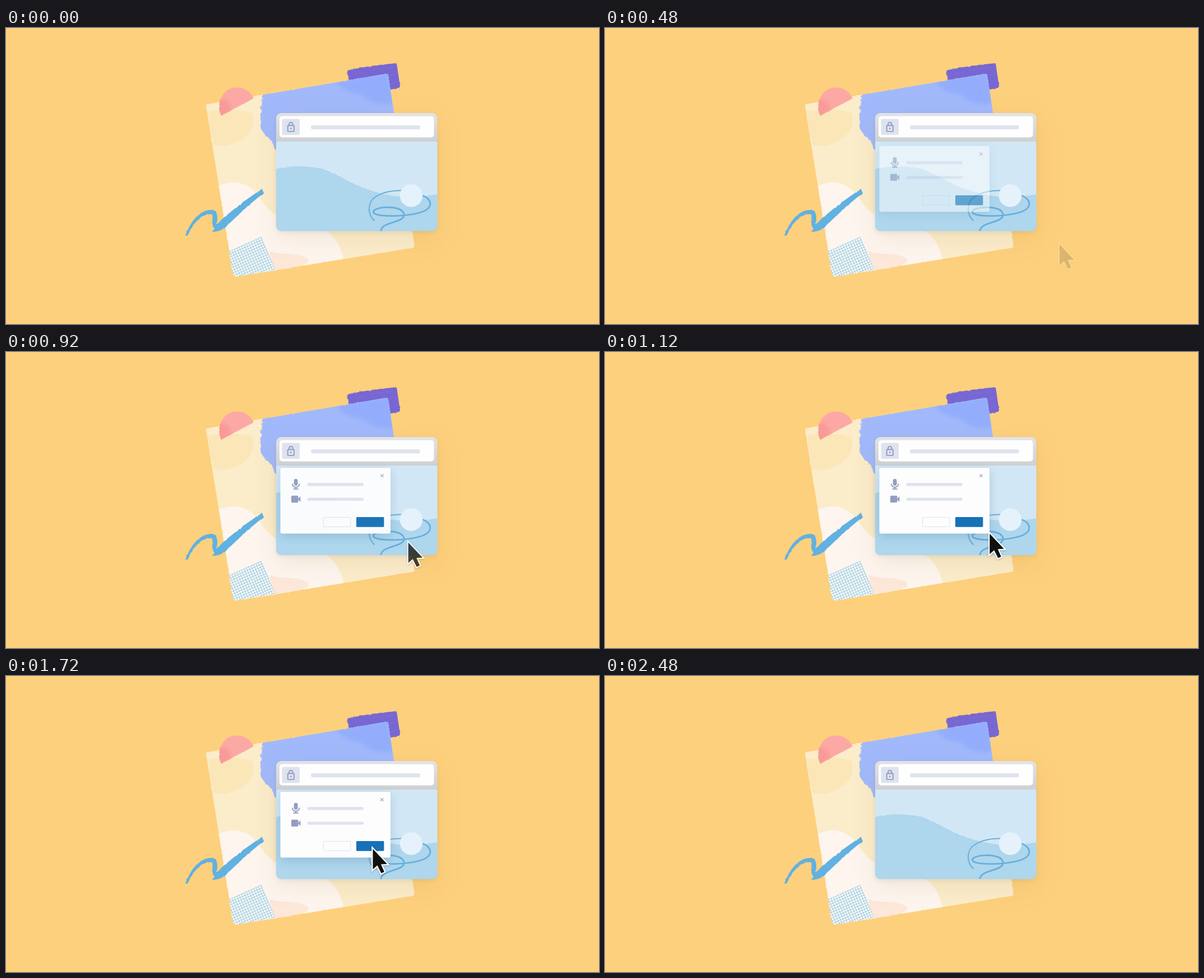
An HTML page that plays this animation: 1058 px wide and 529 px high, repeating every 4 s.

```html
<!DOCTYPE html>
<html lang="en">
<head>
<meta charset="utf-8">
<title>Permission prompt</title>
<style>
html, body { margin: 0; height: 100%; overflow: hidden; background: #fdd07d; }
svg { display: block; width: 100%; height: 100%; }
#window { filter: drop-shadow(0 14px 20px rgba(150, 110, 40, .1)) drop-shadow(0 2px 3px rgba(90, 90, 90, .1)); }
#dialog { filter: drop-shadow(0 5px 9px rgba(50, 90, 130, .22)); }
#cursor { filter: drop-shadow(0 1px 1.5px rgba(0, 0, 0, .25)); }
</style>
</head>
<body>
<svg viewBox="0 0 1058 529">
  <defs>
    <filter id="rough" x="-5%" y="-5%" width="110%" height="110%" color-interpolation-filters="sRGB">
      <feTurbulence type="fractalNoise" baseFrequency=".13" numOctaves="3" seed="4"/>
      <feColorMatrix values="1 0 0 0 0  0 1 0 0 0  0 0 1 0 0  0 0 0 0 1" result="noise"/>
      <feDisplacementMap in="SourceGraphic" in2="noise" scale="2.5" xChannelSelector="R" yChannelSelector="G"/>
    </filter>
    <filter id="torn" x="-5%" y="-5%" width="110%" height="110%" color-interpolation-filters="sRGB">
      <feTurbulence type="fractalNoise" baseFrequency=".12" numOctaves="3" seed="9"/>
      <feColorMatrix values="1 0 0 0 0  0 1 0 0 0  0 0 1 0 0  0 0 0 0 1" result="noise"/>
      <feDisplacementMap in="SourceGraphic" in2="noise" scale="8" xChannelSelector="R" yChannelSelector="G"/>
    </filter>
    <filter id="soft"><feGaussianBlur stdDeviation="3"/></filter>
    <pattern id="grid" width="4.7" height="4.7" patternUnits="userSpaceOnUse" patternTransform="translate(398 399) rotate(-24)">
      <path d="M0 .5H4.7M.5 0V4.7" stroke="#86c2e6" stroke-width=".85"/>
    </pattern>
    <linearGradient id="bar" x2="0" y2="1">
      <stop stop-color="#e3e3e5"/><stop offset="1" stop-color="#cfd0d2"/>
    </linearGradient>
    <clipPath id="sheet"><path d="M357 140Q356 137 360 136L678 82Q681 81 682 85L729 389Q730 392 726 393L411 444Q406 444 405 439Z"/></clipPath>
    <clipPath id="page"><rect x="482" y="152" width="287.5" height="211" rx="9"/></clipPath>
    <clipPath id="half"><path id="halfShape" d="M384 157C375 140 383 114 402 108C420 103 436 111 442 126C422 136 402 147 384 157Z"/></clipPath>
  </defs>

  <g filter="url(#rough)">
    <path d="M609 78Q609 76 612 75Q650 67 695 63Q698 64 698 70L703 104Q703 107 700 107L687 110L613 98Z" fill="#7867d3"/>
    <path d="M622 83L640 79M648 76L672 73M676 72L690 70M684 84L698 82M690 98L699 96" stroke="#9078c8" stroke-width=".8" opacity=".6"/>
  </g>

  <g filter="url(#rough)"><g clip-path="url(#sheet)">
    <path d="M340 70H740V460H340Z" fill="#fbecca"/>
    <path d="M360 150Q400 140 440 152Q446 175 428 194Q405 214 370 209Z" fill="#fbe5b2" opacity=".75"/>
    <path d="M376 284C405 268 435 276 452 302C470 335 500 345 540 350C580 358 598 385 603 418L400 455Z" fill="#fdf5ee"/>
    <path d="M470 398C492 408 548 400 538 420L478 442Z" fill="#fce7d9"/>
    <path d="M459 116L700 70V230H500L482 217Q474 200 464 193Q452 183 453 162Q457 140 455 128Z" fill="#a1b9fb" filter="url(#torn)"/>
    <path d="M592 94L684 78L692 134Q660 142 635 120Q606 116 592 100Z" fill="#8faafc" opacity=".75" filter="url(#soft)"/>
  </g></g>
  <path d="M398 399L456 373L480 432L411 444Q406 443 404 436Z" fill="#fdf9f2"/>
  <path d="M398 399L456 373L480 432L411 444Q406 443 404 436Z" fill="url(#grid)"/>

  <g filter="url(#rough)">
    <use href="#halfShape" fill="#fca9a5"/>
    <g clip-path="url(#half)"><ellipse cx="386" cy="144" rx="15" ry="17" fill="#f8938f" opacity=".65" filter="url(#soft)"/></g>
    <path d="M320 371C328 350 342 325 368 325C378 327 378 338 376 351C390 337 425 307 457 288L460 295C431 317 407 341 390 358Q378 365 368 364L372 359C365 350 370 340 368 333C350 330 333 350 324 371Z" fill="#61b1e2"/>
  </g>

  <g id="window"><g clip-path="url(#page)">
    <path d="M482 152H770V203H482Z" fill="url(#bar)"/>
    <path d="M482 203H770V364H482Z" fill="#d1e7f5"/>
    <path d="M475 255C500 245 525 247 550 249C588 254 610 279 650 290C690 304 730 305 776 296V370H475Z" fill="#aed6ed" filter="url(#rough)"/>
    <g fill="none" stroke="#67afdd" stroke-width="2.8" stroke-linecap="round">
      <path d="M657 344C645 333 646 316 654 306C665 295 685 290 706 290.5" stroke-width="2"/>
      <path d="M742 299C762 306 763 323 738 330C713 337 671 338 658 332C649 326 665 320 684 320.5C708 321 716 333 706 341C695 349 667 349 669 365"/>
    </g>
    <circle cx="723" cy="299.5" r="20.3" fill="#e6f2fb"/>
    <rect x="488" y="157.5" width="275.5" height="38" rx="5" fill="#fefefe"/>
    <rect x="492.5" y="162.5" width="31.5" height="28.5" rx="2.5" fill="#dfe3ee"/>
    <rect x="544" y="174" width="195" height="7.2" rx="3.6" fill="#dfe3ee"/>
    <g fill="none" stroke="#8f9bc1" stroke-width="1.9">
      <rect x="502.7" y="174.3" width="11.2" height="10.6" rx="1"/>
      <path d="M505 174V172a3.3 3.3 0 0 1 6.6 0V174"/>
    </g>
    <circle cx="508.3" cy="179.6" r="1.4" fill="#8f9bc1"/>
  </g></g>

  <g id="dialog" opacity="0">
    <rect x="489.5" y="207" width="196.5" height="117.5" rx="3" fill="#fdfdfe"/>
    <path d="M668.4 218.4l5.2 5.2m0-5.2l-5.2 5.2" stroke="#8f9bb5" stroke-width="1.1"/>
    <g fill="#929dc0">
      <rect x="513.7" y="226.8" width="6.8" height="12" rx="3.4"/>
      <path d="M510.8 235.5a6.3 6.3 0 0 0 12.6 0M517.1 241.8v3.2M512.5 244.8h9.2" fill="none" stroke="#929dc0" stroke-width="2"/>
      <rect x="509" y="256.7" width="12.4" height="12.4" rx="1.6"/>
      <path d="M520.5 262.9l4.8-5v10z"/>
    </g>
    <g fill="#dfe3ee">
      <rect x="537.5" y="234" width="100.5" height="5.4" rx="2.7"/>
      <rect x="537.5" y="260.4" width="100.5" height="5.4" rx="2.7"/>
    </g>
    <rect x="566.5" y="295.5" width="48.5" height="16.8" rx="1" fill="none" stroke="#dde4ee"/>
    <rect x="625" y="295" width="49.4" height="17.8" rx="1.5" fill="#1771b5"/>
  </g>

  <g id="cursor" opacity="0">
    <path d="M3 4.5V41L11 34L18 48L23.5 45.5L17.5 32L28.5 31.5Z" fill="#111" stroke="#fff" stroke-width="4.4" paint-order="stroke"/>
  </g>
</svg>
<script>
const dialog = document.getElementById('dialog');
const cursor = document.getElementById('cursor');
const span = (t, from, to) => Math.min(1, Math.max(0, (t - from) / (to - from)));
const smooth = u => u * u * (3 - 2 * u);
const mix = (a, b, u) => a + (b - a) * u;

// Cubic Bezier easing (.2, 0, .37, 1), solved by bisection.
function glide(u) {
  let low = 0, high = 1;
  for (let i = 0; i < 24; i++) {
    const s = (low + high) / 2, r = 1 - s;
    if (.6 * r * r * s + 1.11 * r * s * s + s ** 3 < u) low = s; else high = s;
  }
  return smooth(low);
}

function draw(now) {
  const t = Math.floor(now % 4000 / 40) * 40;
  const enter = span(t, 0, 960);
  const leave = span(t, 1960, 2480) ** 3;
  const lift = 8 * (1 - smooth(enter));
  dialog.setAttribute('opacity', enter * (1 - leave));
  dialog.setAttribute('transform', `translate(588 ${265.5 + lift}) scale(${1 - .1 * leave}) translate(-588 -265.5)`);

  const move = glide(span(t, 400, 1680));
  cursor.setAttribute('opacity', span(t, 380, 1080) * (1 - span(t, 1980, 2480)));
  cursor.setAttribute('transform', `translate(${mix(813, 651.5, move)} ${mix(385, 304.5, move)})`);
  requestAnimationFrame(draw);
}
requestAnimationFrame(draw);
</script>
</body>
</html>
```
